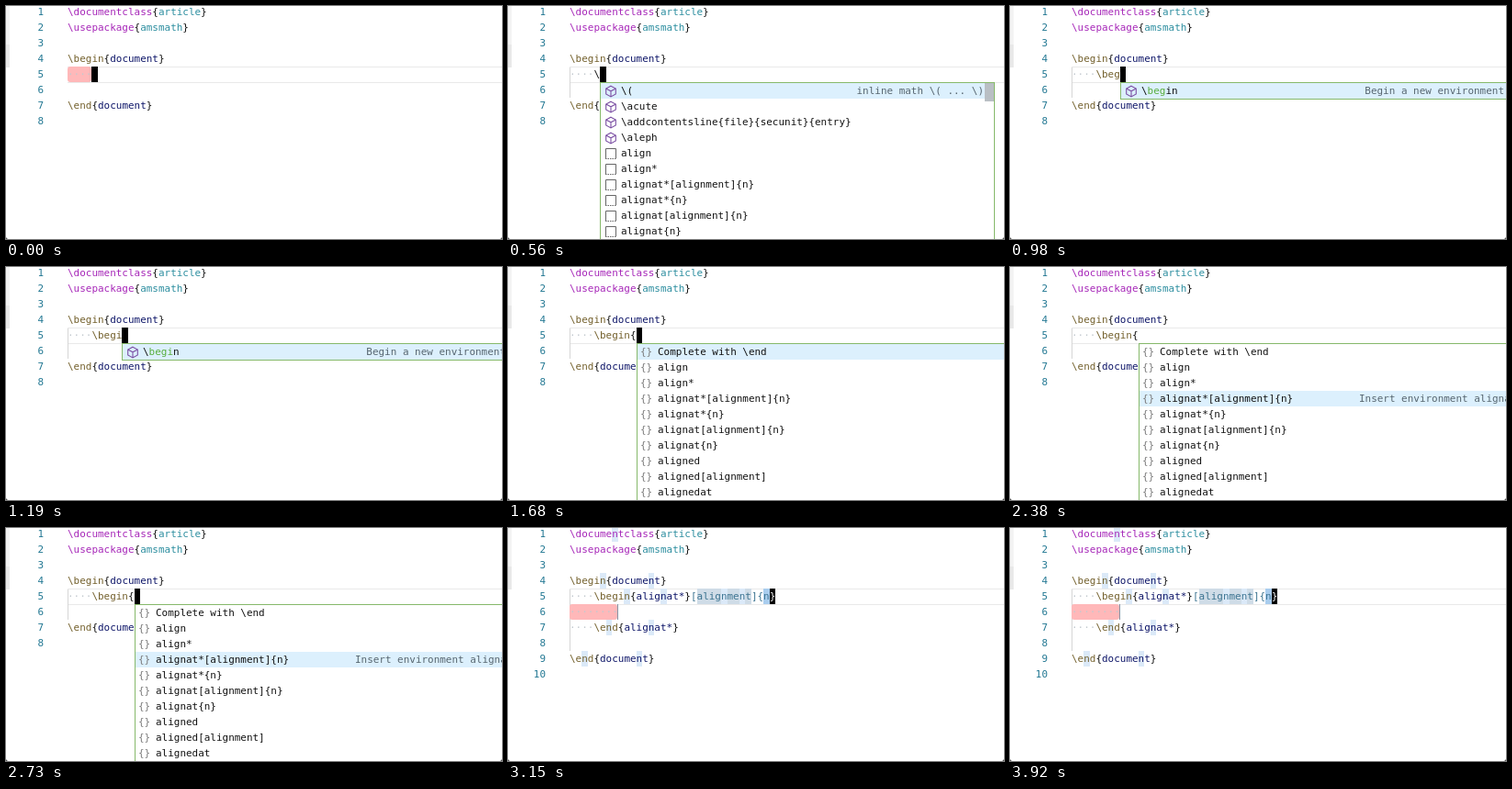
Write an HTML page that moves like this. It is 540 px wide and 254 px high and loops after 4.06 s.

```html
<!DOCTYPE html>
<html lang="en">
<head>
<meta charset="utf-8">
<title>LaTeX completion</title>
<style>
html, body { margin: 0; width: 100%; height: 100%; overflow: hidden; background: #fff; }
#stage {
  position: relative; width: 540px; height: 254px; overflow: hidden; background: #fff;
  font: 10.963px/17px "DejaVu Sans Mono", monospace; white-space: pre; color: #111;
}
#stage div, #stage svg { position: absolute; }
.strip { left: 0; width: 4px; top: 0; height: 67px; background: linear-gradient(#f3f3f3 42px, #e9e9e9 42px); }
.corner { bottom: 0; width: 3px; height: 3px; }
.num { width: 41px; left: 0; text-align: right; color: #237893; }
.row { left: 67px; right: 0; top: 66px; height: 16px; border: solid #e9e9e9; border-width: 1px 0; }
.guide { left: 67px; top: 67px; width: 1px; background: #d6d6d6; }
.box { height: 17px; }
.error { background: #ffb8b9; border-radius: 3px; }
.stop { background: #cfdce7; }
.match { background: #dbe9f8; }
.pick { background: #a9cdee; }
.cursor { background: #000; color: #fff; }
.final { background: #8794a5; }
.dot { color: #c3c9cf; }
.pre { color: #a626b8; }
.cmd { color: #73602c; }
.arg { color: #2b8d9f; }
.env { color: #0d1568; }
.opt { color: #3b7390; }
.popup { top: 83px; width: 428px; border: 1px solid #86b96a; background: #fff; overflow: hidden; }
.item { left: 0; right: 0; height: 17px; }
.on { background: #dcf0fd; }
.label { left: 22px; color: #111; }
.label b { font-weight: normal; color: #58ad3c; }
.info { right: 11px; color: #56656f; }
.thumb { right: 0; top: 0; width: 10px; height: 20px; background: #b9bfc4; }
.popup svg { left: 4px; top: 2px; width: 14px; height: 14px; fill: none; }
.brace { left: 3px; color: #7a7a7a; }
</style>
</head>
<body>
<div id="stage"></div>
<script>
const LOOP = 4060, CELL = 6.6, LEFT = 67, LINE = 17;
const stage = document.getElementById('stage');

const icons = {
  cube: '<svg viewBox="0 0 14 14" stroke="#7b4fa3" stroke-width="1.1"><path d="M7 1.2L12.3 4V10L7 12.9L1.7 10V4ZM1.7 4L7 6.8L12.3 4M7 6.8V12.9"/></svg>',
  snippet: '<svg viewBox="0 0 14 14" stroke="#666"><path d="M1.5 12V1.5H12.5V12"/><path d="M1 12.5H13" stroke-dasharray="1.5 1"/></svg>',
  brace: '<div class="brace">{}</div>'
};

const envs = ['align', 'align*', 'alignat*[alignment]{n}', 'alignat*{n}',
  'alignat[alignment]{n}', 'alignat{n}', 'aligned', 'aligned[alignment]', 'alignedat'];
const macros = ['\\(', '\\acute', '\\addcontentsline{file}{secunit}{entry}', '\\aleph'];
const lists = {
  '\\': macros.concat(envs.slice(0, 6)),
  '\\b': ['\\begin', '\\backslash', '\\bar', '\\beta', '\\bibitem', '\\big', '\\binom', '\\bmod', '\\boldsymbol', '\\bot'],
  '\\be': ['\\begin', '\\beta', '\\beth'],
  '\\begin{': ['Complete with \\end'].concat(envs)
};

// [start time, typed text]
const typing = [[0, ''], [70, '\\'], [630, '\\b'], [840, '\\be'], [980, '\\beg'],
  [1120, '\\begi'], [1330, '\\begin'], [1470, '\\begin{']];
// [start time, selected entry]
const picks = [[0, 0], [1960, 1], [2310, 2], [2380, 3]];
const details = ['', 'Insert environment align.', 'Insert environment align*.', 'Insert environment alignat.'];
const ACCEPT = 2800, TAB = 3150;

const at = (steps, t) => steps.filter(s => s[0] <= t).pop()[1];
const between = (t, a, b) => t >= a && t < b;
const span = (cls, s) => `<span class="${cls}">${s}</span>`;
const lineTop = line => (line - 1) * LINE - 2;
const box = (cls, line, col, n = 1, text = '') =>
  `<div class="box ${cls}" style="left:${LEFT + col * CELL}px;top:${lineTop(line)}px;width:${n * CELL}px">${text}</div>`;

function paint(text) {
  return text
    .replace(/^ +/, s => span('dot', '·'.repeat(s.length)))
    .replace(/\\(documentclass|usepackage)\{(\w+)\}/, (m, c, a) => span('pre', '\\' + c) + '{' + span('arg', a) + '}')
    .replace(/(\\(?:begin|end))\{([\w*]+)\}/, (m, c, e) => span('cmd', c) + '{' + span('env', e) + '}')
    .replace(/\[alignment\]\{n/, s => span('opt', s))
    .replace(/\\b[egin]*(?=\{?$)/, s => span('cmd', s));
}

function popup(typed, sel) {
  const n = typed.length, env = typed.endsWith('{');
  const items = lists[typed] || ['\\begin'];
  const info = env ? details[sel] : n === 1 ? 'inline math \\( ... \\)' : 'Begin a new environment';
  const rows = items.map((name, i) => {
    const icon = env ? 'brace' : name[0] === '\\' ? 'cube' : 'snippet';
    const label = env || n < 2 ? name : `\\<b>${name.slice(1, n)}</b>${name.slice(n)}`;
    const extra = i === sel ? `<div class="info">${info}</div>` : '';
    return `<div class="item${i === sel ? ' on' : ''}" style="top:${i * LINE}px">${icons[icon]}<div class="label">${label}</div>${extra}</div>`;
  }).join('');
  const left = Math.round(LEFT + (4 + n) * CELL);
  const thumb = items.length > 9 ? '<div class="thumb"></div>' : '';
  return `<div class="popup" style="left:${left}px;height:${items.length * LINE}px">${rows}${thumb}</div>`;
}

function view(t) {
  const done = t >= ACCEPT, tabbed = t >= TAB;
  const typed = at(typing, t);
  const head = ['\\documentclass{article}', '\\usepackage{amsmath}', '', '\\begin{document}'];
  const body = done
    ? ['    \\begin{alignat*}[alignment]{n}', '        ', '    \\end{alignat*}', '']
    : ['    ' + typed, ''];
  const lines = [...head, ...body, '\\end{document}', ''];
  let html = '<div class="strip"></div><div class="row"></div>';

  if (!typed) html += box('error', 5, 0, 4);
  else html += `<div class="guide" style="height:${done ? 67 : 33}px"></div>`;

  if (done) {
    html += box('error', 6, 0, 7.9) + box('stop', 5, 21, 9) + box('stop', 5, 32);
    if (tabbed) lines.forEach((s, i) => {
      for (const m of s.matchAll(/n/g)) html += box('match', i + 1, m.index);
    });
    html += tabbed ? box('pick', 5, 32) : box('pick', 5, 21, 9);
    html += box('final', 6, 7.9, 0.2);
  }

  lines.forEach((s, i) => {
    html += `<div class="num" style="top:${lineTop(i + 1)}px">${i + 1}</div>` +
      `<div style="left:${LEFT}px;top:${lineTop(i + 1)}px">${paint(s)}</div>`;
  });

  if (typed && !done) html += popup(typed, at(picks, t));
  if (!between(t, 2030, 2520) && !between(t, 3360, 3850)) {
    const col = !done ? 4 + typed.length : tabbed ? 33 : 30;
    html += box('cursor', 5, col, 1, done ? lines[4][col] : '');
  }
  return html +
    '<div class="corner" style="left:0;background:radial-gradient(circle at 100% 0,#0000 2.6px,#555 3.4px)"></div>' +
    '<div class="corner" style="right:0;background:radial-gradient(circle at 0 0,#0000 2.6px,#555 3.4px)"></div>';
}

let shown = '';
const start = performance.now();
function tick() {
  const html = view((performance.now() - start) % LOOP);
  if (html !== shown) stage.innerHTML = shown = html;
  requestAnimationFrame(tick);
}
tick();
</script>
</body>
</html>
```
